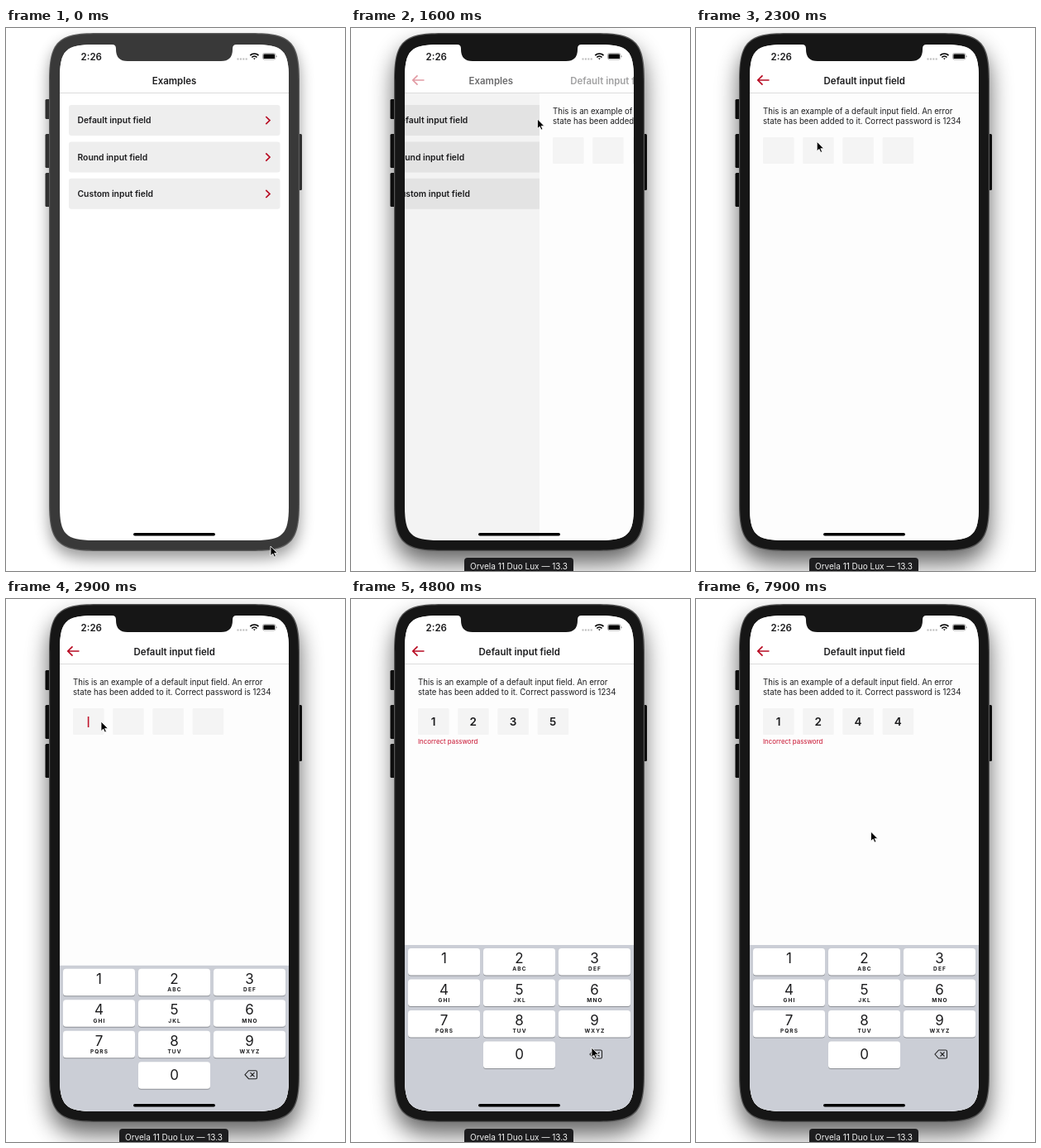
Recreate the animation shown at these times as an HTML page. Size 410 px wide and 656 px high, loop 8000 ms.

```html
<!DOCTYPE html>
<html lang="en">
<head>
<meta charset="utf-8">
<title>Input field demo</title>
<style>
  html, body { margin: 0; height: 100%; overflow: hidden; background: #fff; }
  svg { display: block; width: 100%; height: 100%; --body: #393939; --rim: #5c5c5c; --key: #303030; }
  svg.active { --body: #161616; --rim: #565656; --key: #0d0d0d; }
  text { font-family: Inter, "Open Sans", sans-serif; fill: #1c1c1e; }
  .mid { text-anchor: middle; }
  .bold { font-weight: 600; }
  .title { font-size: 11.45px; }
  .body { fill: var(--body); }
  .side { fill: var(--key); }
  .shade { fill: #000; opacity: .4; filter: blur(9px); transform: translateY(9px); }
  .active .shade { opacity: .6; filter: blur(14px); transform: translateY(15px); }
  .line { fill: none; stroke: #b80d24; stroke-width: 1.7; }
</style>
</head>
<body>
<svg viewBox="0 0 410 656">
  <defs>
    <clipPath id="screen"><path id="glass"/></clipPath>
  </defs>
  <path id="shadow" class="shade"/>
  <g class="side">
    <rect x="47.5" y="86" width="7" height="24" rx="1.5"/>
    <rect x="47.5" y="128" width="7" height="41" rx="1.5"/>
    <rect x="47.5" y="175" width="7" height="41" rx="1.5"/>
    <rect x="352" y="128" width="6" height="68" rx="1.5"/>
  </g>
  <path id="rim" fill="var(--rim)"/>
  <path id="shell" class="body"/>
  <g clip-path="url(#screen)">
    <path fill="#fff" d="M65 20h277v599H65z"/>
    <g id="list"></g>
    <path id="dim" d="M65 79h277v540H65z"/>
    <g id="page">
      <path fill="#fdfdfd" d="M65 79h277v540H65z"/>
      <g font-size="9.65">
        <text x="81" y="104.3">This is an example of a default input field. An error</text>
        <text x="81" y="116">state has been added to it. Correct password is 1234</text>
      </g>
      <g id="boxes"></g>
      <path id="caret" d="M-.8 142h1.6v13h-1.6z" fill="#c0142c"/>
      <text id="error" x="81" y="175" font-size="7.9" style="fill:#c8102e">Incorrect password</text>
    </g>
    <g id="keys"></g>
    <path fill="#fff" d="M65 20h277v58H65z"/>
    <path fill="#dcdcdc" d="M65 78h277v1H65z"/>
    <text id="oldTitle" class="mid bold title" y="67.5">Examples</text>
    <text id="newTitle" class="mid bold title" y="67.5">Default input field</text>
    <path id="back" class="line" d="M88.5 63H75M80.5 57.3L74.8 63l5.7 5.7"/>
    <text class="mid bold" x="103.3" y="38.5" font-size="11.5">2:26</text>
    <path d="M279.5 37.5h13" stroke="#bbb" stroke-width="2" stroke-dasharray="2 1.4"/>
    <g fill="none" stroke="#000" stroke-width="1.7">
      <path d="M295.3 33.1a7.2 7.2 0 0 1 10.2 0M297.3 35.5a4.4 4.4 0 0 1 6.2 0"/>
      <path d="M299 36.6h2.8l-1.4 1.7z" fill="#000" stroke="none"/>
      <rect x="310.5" y="30.6" width="15.4" height="7.4" rx="2" stroke="#888" stroke-width=".7"/>
    </g>
    <rect x="311.4" y="31.5" width="13.6" height="5.6" rx="1.2"/>
    <path d="M326.8 33v2.6q1.3-1.3 0-2.6"/>
    <rect x="154" y="610" width="99" height="3.5" rx="1.75"/>
  </g>
  <path class="body" d="M128.5 19v1q4.5 0 4.5 5v1q0 14 14 14h113q14 0 14-14v-1q0-5 4.500-5v-1z"/>
  <g id="label">
    <rect x="137" y="640" width="132" height="24" rx="4" fill="#1d1d1f"/>
    <text class="mid" x="203" y="654" font-size="10" style="fill:#f2f2f2">Orvela 11 Duo Lux — 13.3</text>
  </g>
  <path id="cursor" d="M0 0v11.6l2.7-2.5 1.8 4 1.900-.8-1.800-3.900h3.700z" stroke="#fff" stroke-width=".8"/>
</svg>
<script>
const $ = id => document.getElementById(id);
const svg = document.querySelector('svg');
const clamp = v => Math.min(1, Math.max(0, v));
const easeOut = (t, start, length) => 1 - (1 - clamp((t - start) / length)) ** 3;
const shift = (el, x, y) => el.setAttribute('transform', `translate(${x} ${y})`);

// Rectangle whose corners ease into the sides over a given reach
function smoothRect(id, x, y, w, h, reach) {
  const c = reach * .82, r = reach;
  $(id).setAttribute('d', `M${x} ${y + r}c0 ${-c} ${r - c} ${-r} ${r} ${-r}h${w - 2 * r}
    c${c} 0 ${r} ${r - c} ${r} ${r}v${h - 2 * r}c0 ${c} ${c - r} ${r} ${-r} ${r}
    h${2 * r - w}c${-c} 0 ${-r} ${c - r} ${-r} ${-r}z`);
}
smoothRect('shadow', 52, 6, 303, 626, 58);
smoothRect('rim', 52, 6, 303, 626, 58);
smoothRect('shell', 53.2, 7.2, 300.6, 623.6, 56.5);
smoothRect('glass', 65, 20, 277, 599, 41);

$('list').innerHTML = ['Default', 'Round', 'Custom'].map((name, i) =>
  `<g transform="translate(0 ${i * 44.4})">
    <rect x="76" y="93" width="255.5" height="37" rx="3" fill="#eee"/>
    <text class="bold" x="86.5" y="115.3" font-size="10.35">${name} input field</text>
    <path class="line" d="M314.3 107l4.7 4.6-4.7 4.6"/></g>`).join('');

$('boxes').innerHTML = [0, 1, 2, 3].map(i =>
  `<rect x="${81 + i * 48.2}" y="132" width="37.5" height="32" rx="1" fill="#f4f4f4"/>
   <text class="mid bold digit" x="${99.6 + i * 48.2}" y="152.8" font-size="13.5"></text>`).join('');
const digits = [...document.querySelectorAll('.digit')];

const letters = ['', 'ABC', 'DEF', 'GHI', 'JKL', 'MNO', 'PQRS', 'TUV', 'WXYZ'];
function key(x, y, digit, sub, base) {
  return `<g transform="translate(${x} ${y})">
    <rect y="1" width="87" height="32.5" rx="3.5" fill="#8d9096"/>
    <rect width="87" height="32.5" rx="3.5" fill="#fff"/>
    <text class="mid" x="43.5" y="${base}" font-size="17">${digit}</text>
    <text class="mid" x="44" y="27.3" font-size="6.5" font-weight="700" letter-spacing="1.1">${sub}</text></g>`;
}
$('keys').innerHTML = '<path fill="#cbced6" d="M65 418h277v201H65z"/>' +
  letters.map((sub, i) => key(69 + i % 3 * 91, 422 + Math.floor(i / 3) * 37.5, i + 1, sub, 18)).join('') +
  key(160, 534.5, 0, '', 21.5) +
  `<path d="M293.5 545h8.500q1.500 0 1.500 1.500v7q0 1.500-1.500 1.500h-8.500l-4.500-5zM295.500 547.500l5 5m0-5l-5 5"
    fill="none" stroke="#222" stroke-width="1.1"/>`;

// Pointer stops: time, x, y
const route = [
  [300, 320, 626], [400, 314, 602], [500, 290, 570], [600, 278, 487], [700, 277, 457],
  [800, 259, 360], [900, 226, 170], [1000, 208, 83], [1100, 214, 68], [1200, 222, 96],
  [1300, 225.5, 110], [2050, 225.5, 110], [2400, 115, 148], [3050, 115, 148],
  [3550, 261, 186], [3700, 261, 186], [4500, 291, 542], [5050, 291, 542], [5300, 211.5, 281]
];
function pointer(t) {
  const i = route.findIndex(stop => stop[0] > t);
  if (i === 0) return route[0].slice(1);
  if (i < 0) return route.at(-1).slice(1);
  const [t0, x0, y0] = route[i - 1], [t1, x1, y1] = route[i];
  const k = (t - t0) / (t1 - t0);
  return [x0 + (x1 - x0) * k, y0 + (y1 - y0) * k];
}

// Field contents after each key press
const entries = [
  [2720, ''], [3000, '1'], [3800, '12'], [4200, '123'], [4600, '1235'],
  [6300, '123'], [6600, '12'], [7500, '124'], [7800, '1244']
];
function blink(age) {
  const p = age % 1000;
  return p < 500 ? 1 : p < 800 ? clamp((700 - p) / 200) : (p - 800) / 200;
}

function draw(t) {
  const push = easeOut(t, 1520, 500), rest = 1 - push;
  svg.classList.toggle('active', t >= 1500);
  shift($('list'), -83 * push, 0);
  $('dim').setAttribute('opacity', .11 * push);
  shift($('page'), 277 * rest, 0);
  shift($('oldTitle'), 203.5 - 83 * push, 0);
  $('oldTitle').setAttribute('opacity', rest ** .8);
  shift($('newTitle'), 203.8 + 188 * rest, 0);
  $('newTitle').setAttribute('opacity', push);
  $('back').setAttribute('opacity', push);
  shift($('keys'), 0, 201 * (1 - easeOut(t, 2720, 360)));

  const [since, value] = entries.findLast(e => e[0] <= t) || [0, null];
  digits.forEach((el, i) => el.textContent = value?.[i] ?? '');
  const full = value?.length === 4;
  $('caret').setAttribute('opacity', value === null || full ? 0 : blink(t - since));
  shift($('caret'), 99.6 + 48.2 * (value?.length ?? 0), 0);
  $('error').setAttribute('opacity', full ? 1 : 0);

  $('label').setAttribute('opacity', t >= 500 ? 1 : 0);
  shift($('cursor'), ...pointer(t));
}

const begin = performance.now();
function tick() {
  draw((performance.now() - begin) % 8000);
  requestAnimationFrame(tick);
}
tick();
</script>
</body>
</html>
```
